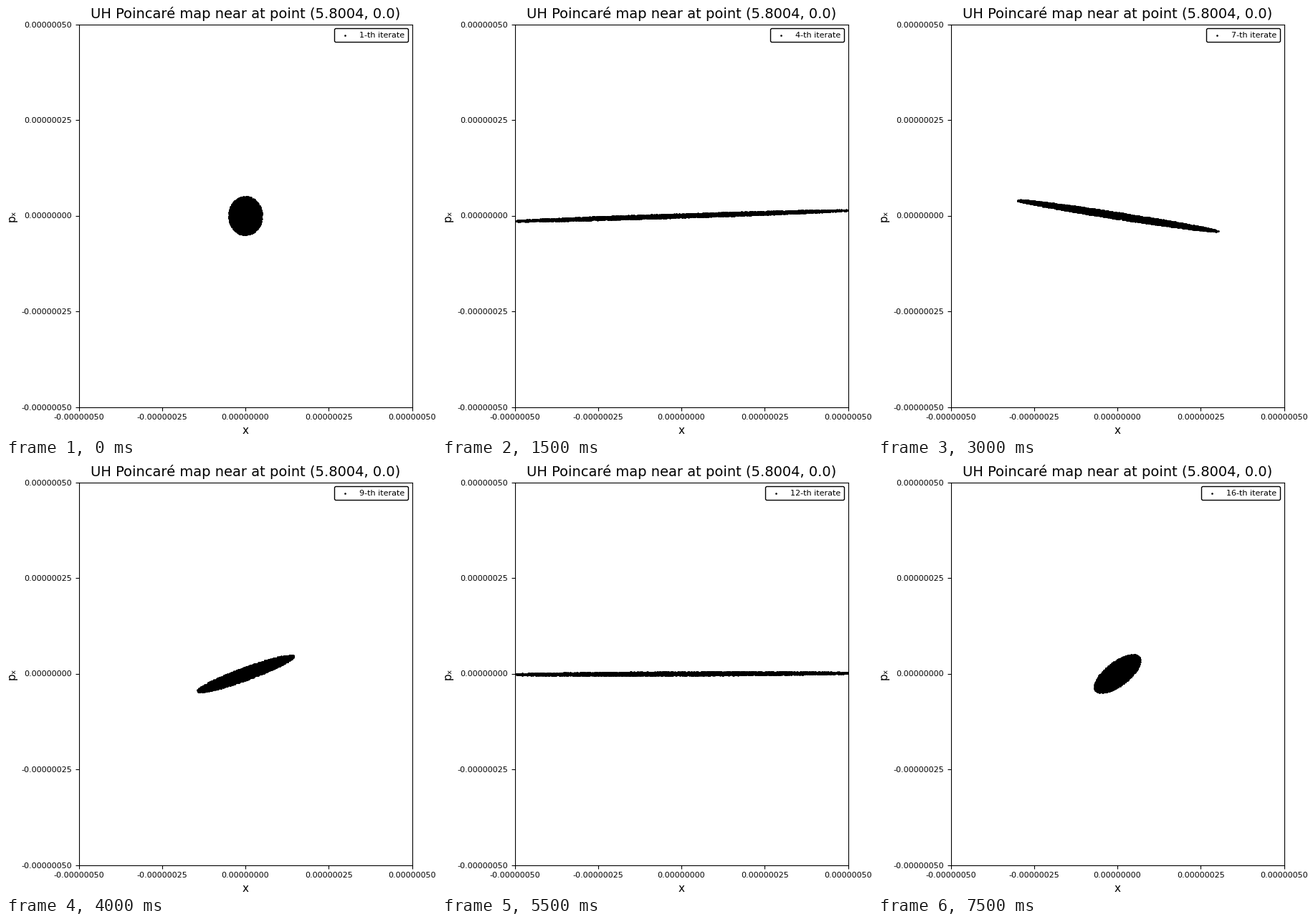
A matplotlib script for the animation above (8 s loop, 600 px wide and 600 px high).

```python
import numpy as np
import matplotlib.pyplot as plt
from matplotlib.animation import FuncAnimation
from matplotlib.ticker import FormatStrFormatter

plt.rcParams["font.family"] = "DejaVu Sans"

SIZE, DPI = 600, 100
LIM = 5e-7        # half width of the window
RADIUS = 5e-8     # radius of the starting disc
N_POINTS = 4000
N_ITER = 16
THETA = 0.4248    # rotation per iterate
STRETCH = 10.77   # x / p axis ratio of the invariant ellipses

rng = np.random.default_rng(7)
r = RADIUS * np.sqrt(rng.random(N_POINTS))
phi = 2 * np.pi * rng.random(N_POINTS)
x0, p0 = r * np.cos(phi), r * np.sin(phi)


def iterate(k):
    """Linearised area-preserving map near the elliptic point, applied k times."""
    c, s = np.cos(k * THETA), np.sin(k * THETA)
    return np.column_stack([c * x0 + STRETCH * s * p0,
                            -s / STRETCH * x0 + c * p0])


fig = plt.figure(figsize=(SIZE / DPI, SIZE / DPI), dpi=DPI, facecolor="white")
left, right, top, bottom = 101.5, 566.5, 25.5, 559.5
ax = fig.add_axes([left / SIZE, 1 - bottom / SIZE,
                   (right - left) / SIZE, (bottom - top) / SIZE])
ax.set(xlim=(-LIM, LIM), ylim=(-LIM, LIM))
for axis in (ax.xaxis, ax.yaxis):
    axis.set_ticks(np.linspace(-LIM, LIM, 5))
    axis.set_major_formatter(FormatStrFormatter("%.8f"))
ax.tick_params(labelsize=8)
ax.set_title("UH Poincaré map near at point (5.8004, 0.0)", fontsize=14)
ax.set_xlabel("x", fontsize=11)
ax.set_ylabel("pₓ", fontsize=11)

dots = ax.scatter(x0, p0, s=1, c="black", linewidths=0.9, label="1-th iterate")
legend = ax.legend(loc="upper right", fontsize=8, scatterpoints=1,
                   framealpha=1, edgecolor="black")
label = legend.get_texts()[0]


def update(k):
    dots.set_offsets(iterate(k))
    label.set_text(f"{k + 1}-th iterate")
    return dots, label


anim = FuncAnimation(fig, update, frames=N_ITER, interval=500,
                     repeat=True, repeat_delay=0, blit=False)
plt.show()
```
